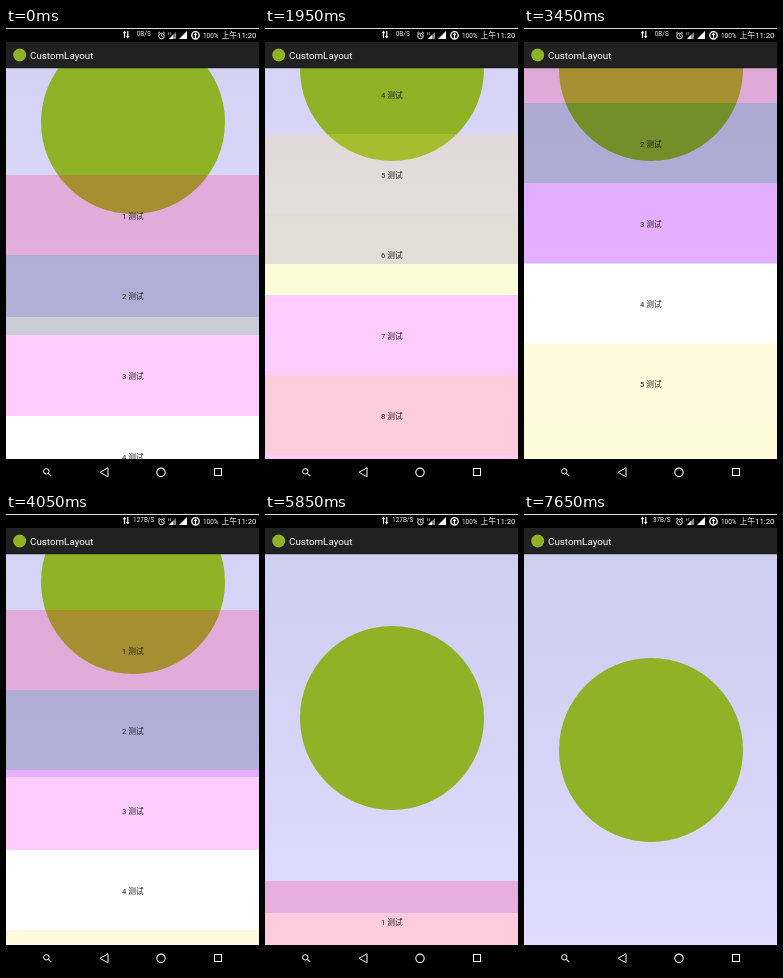
An HTML page with a canvas that plays this animation: 253 px wide and 458 px high, repeating every 7.95 s.

```html
<!DOCTYPE html>
<html lang="zh">
<head>
<meta charset="utf-8">
<title>CustomLayout</title>
<style>
html, body { margin: 0; width: 100%; height: 100%; overflow: hidden; background: #000; }
canvas { display: block; width: 253px; height: 458px; }
</style>
</head>
<body>
<canvas id="stage"></canvas>
<script>
const W = 253, H = 458, LOOP = 7950, STEP = 150;
const TOP = 40, BOTTOM = 431, ROW = 80.2;
const GREEN = 'rgb(143,178,38)';
const FONT = 'Roboto, "Noto Sans CJK SC", "Noto Sans CJK", sans-serif';

const canvas = document.getElementById('stage');
const ratio = window.devicePixelRatio || 1;
canvas.width = W * ratio;
canvas.height = H * ratio;
const ctx = canvas.getContext('2d');
ctx.scale(ratio, ratio);

// [time, scroll position, speed in px/ms]
const keys = [
  [0, 284, 0], [900, 284, 0], [1950, 645.6, 0.06], [2100, 650, 0],
  [3450, 436.7, -0.2], [4650, 180, -0.38], [5100, 0, 0], [5700, 0, 0],
  [5850, 64, 0.6], [6450, 427.5, 0.2], [6550, 438, 0], [7200, 0, 0], [LOOP, 0, 0]
];

// Row tints, laid at 20% over whatever is behind
const tints = [
  '255,0,90', '0,0,60', '255,0,255', null, '255,230,90',
  '235,235,55', '255,0,255', '255,0,90', '255,0,255'
];

function scrollAt(t) {
  const i = keys.findIndex(k => k[0] > t);
  const [t0, a, va] = keys[i - 1], [t1, b, vb] = keys[i];
  const d = t1 - t0, u = (t - t0) / d, w = 1 - u;
  return w * w * (1 + 2 * u) * a + u * w * w * d * va
       + u * u * (3 - 2 * u) * b - u * u * w * d * vb;
}

function rect(x, y, w, h, color) {
  ctx.fillStyle = color;
  ctx.fillRect(x, y, w, h);
}

function label(text, x, y, size, color = '#fff', align = 'left') {
  ctx.font = size + 'px ' + FONT;
  ctx.textAlign = align;
  ctx.fillStyle = color;
  ctx.fillText(text, x, y);
}

function line(points, width = 1, close = false) {
  ctx.beginPath();
  points.forEach(([x, y]) => ctx.lineTo(x, y));
  if (close) ctx.closePath();
  ctx.lineWidth = width;
  ctx.strokeStyle = '#fff';
  ctx.stroke();
}

function shape(points, color = '#fff') {
  ctx.beginPath();
  points.forEach(([x, y]) => ctx.lineTo(x, y));
  ctx.fillStyle = color;
  ctx.fill();
}

function ring(x, y, r, width = 1) {
  ctx.beginPath();
  ctx.arc(x, y, r, 0, Math.PI * 2);
  ctx.lineWidth = width;
  ctx.strokeStyle = '#fff';
  ctx.stroke();
}

function disc(x, y, r, color) {
  ctx.beginPath();
  ctx.arc(x, y, r, 0, Math.PI * 2);
  ctx.fillStyle = color;
  ctx.fill();
}

function drawHeader(scroll) {
  const y = Math.round(TOP - Math.min(scroll / 2, (BOTTOM - TOP) / 2));
  const fill = ctx.createLinearGradient(0, y, 0, y + BOTTOM - TOP);
  fill.addColorStop(0, 'rgb(206,206,240)');
  fill.addColorStop(0.5, 'rgb(213,211,246)');
  fill.addColorStop(1, 'rgb(224,219,255)');
  rect(0, y, W, BOTTOM - TOP, fill);
  disc(127, y + 196, 92, GREEN);
}

function drawRows(scroll) {
  tints.forEach((tint, i) => {
    const y = Math.round(BOTTOM - scroll + i * ROW);
    const next = Math.round(BOTTOM - scroll + (i + 1) * ROW);
    if (next < TOP || y > BOTTOM) return;
    if (tint) rect(0, y, W, next - y, `rgba(${tint},0.2)`);
    label(`${i + 1} 测试`, 126.8, y + 43.5, 7.7, '#222', 'center');
  });
}

function drawStatus(t) {
  rect(0, 0, W, 14, '#000');
  rect(0, 0, W, 1, '#ddd');
  line([[118.5, 10], [118.5, 3.5]], 1.2);
  shape([[116.8, 5.2], [118.5, 2.6], [120.2, 5.2]]);
  line([[121.8, 3], [121.8, 9]], 1.2);
  shape([[120.1, 8], [121.8, 10.4], [123.5, 8]]);
  const speed = t < 3750 ? 0 : t < 6150 ? 127 : 37;
  label(speed + 'B/S', 137.7, 8.2, 6.4, '#eee', 'center');

  ring(155.5, 8, 2.8, 0.9);
  line([[155.5, 6.3], [155.5, 8.2], [156.8, 8.8]], 0.7);
  line([[152, 5.4], [153.8, 4]], 0.9);
  line([[157.2, 4], [159, 5.4]], 0.9);
  shape([[163, 11], [170, 11], [170, 4]], '#888');
  shape([[163, 11], [167, 11], [167, 7]]);
  label('H', 162, 7, 4);
  shape([[173, 11], [181, 11], [181, 3]]);
  ring(189.5, 7.3, 3.7, 1.4);
  line([[189.5, 10], [189.5, 6]], 1.2);
  shape([[187.6, 7], [189.5, 4.6], [191.4, 7]]);
  label('100%', 197, 10, 6.4);
  label('上午11:20', 250.5, 10.4, 7.8, '#fff', 'right');
}

function drawBars(t) {
  drawStatus(t);
  rect(0, 14, W, TOP - 14, '#212121');
  rect(0, TOP - 1, W, 1, '#181818');
  rect(0, TOP, W, 1, 'rgba(0,0,0,0.2)');
  disc(13.7, 27, 6.5, GREEN);
  label('CustomLayout', 24, 30.8, 9.8);

  rect(0, BOTTOM, W, H - BOTTOM, '#000');
  ring(40.3, 443.3, 2.7, 1);
  line([[42.3, 445.3], [45.2, 448.2]], 1.2);
  line([[94, 444.3], [102, 439.8], [102, 448.8]], 1, true);
  ring(155, 444.3, 4.2, 1.1);
  ctx.lineWidth = 1;
  ctx.strokeRect(208.5, 440.5, 7, 7);
}

function draw() {
  const t = Math.floor(performance.now() % LOOP / STEP) * STEP;
  const scroll = scrollAt(t);
  rect(0, 0, W, H, '#fff');
  drawHeader(scroll);
  drawRows(scroll);
  drawBars(t);
  requestAnimationFrame(draw);
}

draw();
</script>
</body>
</html>
```
